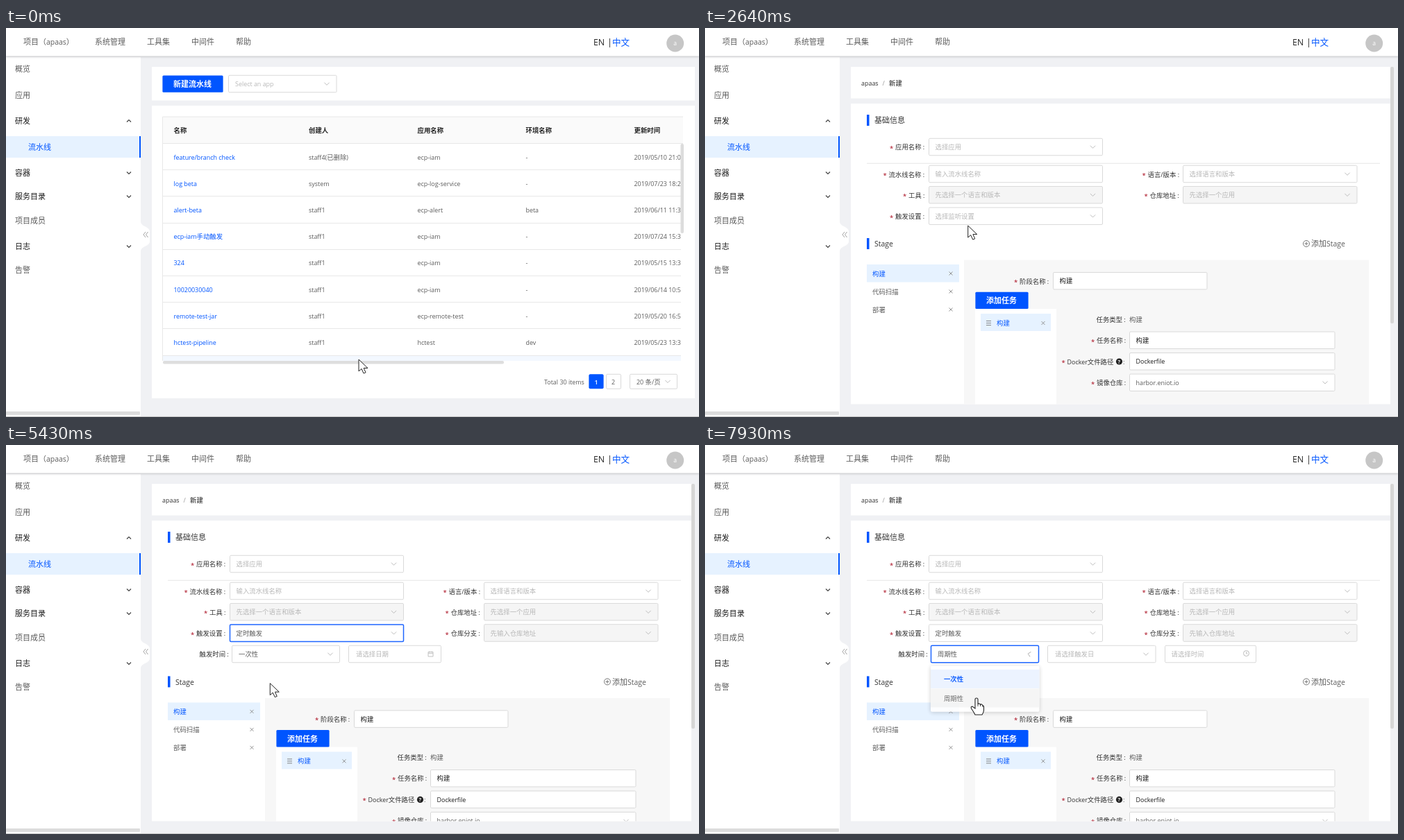
These frames come from a looping animation (998x561 px, 8 s). An HTML page:

```html
<!DOCTYPE html>
<html lang="zh">
<head>
<meta charset="utf-8">
<title>Pipeline</title>
<style>
html, body { margin: 0; width: 100%; height: 100%; overflow: hidden; background: #f0f1f4; }
svg { display: block; width: 100vw; height: 100vh; }
text { font-family: "Open Sans", "Noto Sans CJK SC", "Noto Sans CJK", sans-serif; white-space: pre; }
.float { filter: drop-shadow(0 1px 3px rgba(0,0,0,.2)); }
.bar { filter: drop-shadow(0 1px 1.5px rgba(0,0,0,.2)); }
</style>
</head>
<body>
<svg id="stage" viewBox="0 0 998 561"></svg>
<script>
const BLUE = '#0055ff', PALE = '#e6f2ff', INK = '#1a1a1a', GREY = '#5c5c5c', HINT = '#b8b8b8', LINE = '#d9d9d9';
const LOOP = 8000, SHIFT = 30.4;

// ---- markup helpers ----
// Text is centred vertically on y; Latin runs are set slightly smaller than CJK runs.
function text(x, y, str, { size = 9.4, fill = GREY, weight = 400, id = '' } = {}) {
  const runs = str.split(/([\u2e80-\uffef]+)/).filter(Boolean).map(run =>
    `<tspan font-size="${/[\u2e80-\uffef]/.test(run) ? size : size * .95}">${run}</tspan>`).join('');
  return `<text id="${id}" x="${x}" y="${y + size * .38}" fill="${fill}" font-weight="${weight}">${runs}</text>`;
}
const rect = (x, y, w, h, fill, extra = '') =>
  `<rect x="${x}" y="${y}" width="${w}" height="${h}" fill="${fill}" ${extra}/>`;
const path = (d, stroke, extra = '') => `<path d="${d}" fill="none" stroke="${stroke}" ${extra}/>`;
const at = (x, y, inner, id = '') => `<g id="${id}" transform="translate(${x} ${y})">${inner}</g>`;
const group = (id, inner) => `<g id="${id}">${inner}</g>`;

const chevron = (x, y, id = '') => at(x, y, group(id, path('M-3.6 -1.8L0 1.8L3.6 -1.8', '#bdbdbd')));
const cross = (x, y) => at(x, y, path('M-2.5 -2.5l5 5M2.5 -2.5l-5 5', '#8a8a8a', 'stroke-width=".9"'));
const box = (x, y, w, h = 24.5, { fill = '#fff', id = '' } = {}) =>
  rect(x + .5, y - h / 2, w - 1, h, fill, `id="${id}" stroke="${LINE}" rx="1.5"`);
const button = (x, y, w, label, id = '') =>
  rect(x + .4, y + .4, w - .3, 24.4, BLUE, `rx="1.5" id="${id}"`) +
  text(x + 16, y + 12.7, label, { size: 11, fill: '#fff', weight: 700 });

const label = (x, y, str, { required = true, colon = ' :' } = {}) =>
  (required ? text(x - 8, y + 1.2, '*', { fill: '#a8071a', size: 10 }) : '') + text(x, y, str + colon, { fill: '#333' });
function field(x, y, w, hint, { value, disabled, arrow = true, pad = 9.5 } = {}) {
  return box(x, y, w, 24.5, { fill: disabled ? '#f5f5f5' : '#fff' }) +
    text(x + pad, y, value || hint, { fill: value ? INK : HINT }) + (arrow ? chevron(x + w - 14.5, y) : '');
}
const heading = (y, str) => rect(233, y - 8, 3.5, 16, BLUE) + text(244, y, str, { size: 11, fill: '#333' });

function dropdown(id, x, y, w, options, selected = -1) {
  const rows = options.map((name, i) => {
    const on = i === selected;
    return rect(0, 5.5 + 28 * i, w, 27.5, on ? '#ebf2ff' : '#f5f5f5', on ? '' : `id="${id}Row${i}"`) +
      text(19, 19.5 + 28 * i, name, { fill: on ? BLUE : GREY, weight: on ? 700 : 400 });
  }).join('');
  return at(x, y, group(id, rect(0, 0, w, 11.5 + 28 * options.length, '#fff', 'rx="2" class="float"') + rows));
}

// ---- page frame ----
function frame() {
  const menu = [['概览', 59], ['应用', 97], ['研发', 134, 1], ['容器', 209, -1], ['服务目录', 243, -1],
    ['项目成员', 277.5], ['日志', 315, -1], ['告警', 349]];
  const tabs = [['项目（apaas）', 25], ['系统管理', 128], ['工具集', 203], ['中间件', 267], ['帮助', 331]];
  return rect(0, 0, 998, 561, '#f0f1f4') +
    '<path d="M0 42H194V280Q195 284 200 286Q207 289 207 294V308Q207 312 200 315Q195 317 194 321V561H0Z" fill="#fff"/>' +
    path('M201 294l-3 4l3 4M204.5 294l-3 4l3 4', '#999', 'stroke-width=".9"') +
    rect(0, 0, 998, 40.5, '#fff', 'class="bar"') +
    tabs.map(([name, x]) => text(x, 20, name, { size: 11 })).join('') +
    text(846, 20.5, 'EN', { size: 13, fill: '#222' }) + text(866, 20.5, '|', { size: 13, fill: '#222' }) +
    text(873, 20.5, '中文', { size: 12.6, fill: BLUE }) +
    '<circle cx="963.7" cy="22" r="12.5" fill="#c6c6c6"/>' + text(961.3, 22, 'a', { size: 9, fill: '#fff' }) +
    rect(0, 156, 194, 31, PALE) + rect(192, 156, 2, 31, BLUE) + text(32, 171.5, '流水线', { size: 11, fill: BLUE }) +
    menu.map(([name, y, dir]) => text(13, y, name, { size: 11, fill: dir ? INK : GREY }) +
      (dir ? path(`M174 ${y + dir * 1.5}l3 ${-3 * dir}l3 ${3 * dir}`, '#444', 'stroke-width="1.2"') : '')).join('') +
    rect(0, 553, 193, 5, '#dcdcdc', 'rx="1"');
}

// ---- list page ----
function listPage() {
  const columns = [241.5, 436, 592.5, 748.5, 904.5];
  const rows = `feature/branch check|staff4(已删除)|ecp-iam|-|2019/05/10 21:05
log beta|system|ecp-log-service|-|2019/07/23 18:20
alert-beta|staff1|ecp-alert|beta|2019/06/11 11:32
ecp-iam手动触发|staff1|ecp-iam|-|2019/07/24 15:31
324|staff1|ecp-iam|-|2019/05/15 13:30
10020030040|staff1|ecp-iam|-|2019/06/14 10:52
remote-test-jar|staff1|ecp-remote-test|-|2019/05/20 16:51
hctest-pipeline|staff1|hctest|dev|2019/05/23 13:33`.split('\n').map(r => r.split('|'));
  const heads = ['名称', '创建人', '应用名称', '环境名称', '更新时间'];
  const body = rows.map((row, i) => {
    const y = 186 + i * 38.2;
    return row.map((cell, c) => text(columns[c], y, cell, { fill: c ? GREY : BLUE })).join('') +
      rect(226, Math.floor(y + 18.6), 746, 1, '#e8e8e8');
  }).join('');
  return rect(210, 56, 782, 48.5, '#fff') + rect(210, 112, 782, 422, '#fff') +
    button(225, 68, 87.5, '新建流水线', 'createButton') +
    box(320, 80.5, 156.5) + text(330, 80.5, 'Select an app', { fill: HINT }) + chevron(462, 80.5) +
    rect(226, 128, 749, 38, '#fafafa') + path('M975 128H225.5V480M226 166.5H975', '#e8e8e8') +
    heads.map((h, c) => text(columns[c], 147.5, h, { fill: '#222', weight: 700 })).join('') +
    rect(226, 472, 746, 8, '#f3f8ff', 'id="rowHover"') +
    `<g clip-path="url(#tableClip)">${body}</g>` +
    rect(971.5, 167, 4.5, 129, '#dcdcdc', 'rx="2"') + rect(226, 480, 491, 4.5, '#dedede', 'rx="2"') +
    text(775, 510, 'Total 30 items') +
    rect(839.4, 499.3, 21.2, 21, BLUE, 'rx="2"') + text(847.5, 510, '1', { fill: '#fff', weight: 600 }) +
    box(864, 509.8, 22, 21) + text(872, 510, '2') +
    box(898, 509.8, 69, 21) + text(908, 510.3, '20 条/页') + chevron(953, 509.8);
}

// ---- form page ----
function stageSection() {
  const steps = [['构建', 354], ['代码扫描', 380], ['部署', 406]];
  return heading(311, 'Stage') +
    '<circle cx="866" cy="311" r="4.5" fill="none" stroke="#777"/>' + path('M863.5 311h5M866 308.5v5', '#777') +
    text(873, 311, '添加Stage', { size: 11 }) +
    rect(233, 341, 133, 25.5, PALE) +
    steps.map(([name, y], i) => text(241, y, name, { fill: i ? GREY : BLUE }) + cross(354, y)).join('') +
    rect(373, 334.5, 583, 260, '#f7f7f7') +
    label(453, 365, '阶段名称') + field(501, 364.7, 222.5, '', { value: '构建', arrow: false }) +
    rect(389, 405, 117, 190, '#fff') + button(389, 380.3, 76.5, '添加任务') +
    rect(397, 412, 101, 25, PALE) + path('M405 422.5h7M405 425.5h7M405 428.5h7', '#777', 'stroke-width=".9"') +
    text(420, 425.5, '构建', { fill: BLUE }) + cross(487, 425.5) +
    label(563.5, 420.5, '任务类型', { required: false }) + text(611, 420.5, '构建') +
    label(564, 450.5, '任务名称') + field(611, 450.3, 296.5, '', { value: '构建', arrow: false }) +
    label(521.5, 481, 'Docker文件路径', { colon: '' }) +
    '<circle cx="596.5" cy="481" r="4.6" fill="#222"/>' + text(594.6, 481, '?', { size: 8, fill: '#fff', weight: 700 }) +
    text(602, 481, ':') + field(611, 480.8, 296.5, '', { value: 'Dockerfile', arrow: false }) +
    label(564, 511.5, '镜像仓库') + box(611, 511.3, 296.5) + chevron(893, 511.3) +
    text(620.5, 511.3, '选择镜像仓库', { fill: HINT, id: 'registryHint' }) +
    text(620.5, 511.3, 'harbor.eniot.io', { id: 'registryValue' });
}

function timerRow() {
  const y = 301.5;
  const calendar = at(611.5, y, path('M-3.5 -3h7v6.5h-7zM-3.5 -.8h7M-1.7 -4v2M1.7 -4v2', '#bbb', 'stroke-width=".9"'));
  const clock = at(779.5, y - 1, '<circle r="4" fill="none" stroke="#bbb"/>' + path('M0 -2.5V.5H2', '#bbb', 'stroke-width=".9"'));
  const clear = at(467, y, '<circle r="4.3" fill="#999"/>' + path('M-1.5 -1.5l3 3M1.5 -1.5l-3 3', '#fff'), 'clearIcon');
  return label(640.5, 271.5, '仓库分支') + field(688, 271, 251.5, '先输入仓库地址', { disabled: true }) +
    label(278.5, y, '触发时间', { required: false }) + box(325, y, 156, 24.5, { id: 'modeBox' }) +
    text(335, y, '一次性', { id: 'modeOnce' }) + text(335, y, '周期性', { id: 'modeRepeat' }) +
    clear + group('modeArrowWrap', chevron(467, y, 'modeArrow')) +
    group('onceFields', field(493, y, 134, '请选择日期', { arrow: false, pad: 11 }) + calendar) +
    group('repeatFields', field(493, y, 156.5, '请选择触发日', { pad: 11 }) +
      field(662, y, 132, '请选择时间', { arrow: false }) + clock);
}

function formPage() {
  return rect(210, 56, 777, 45.5, '#fff') + rect(210, 109, 777, 433.5, '#fff') +
    rect(987, 56, 5, 370, '#d6d6d6', 'rx="2" id="pageScroll"') +
    text(225, 79.5, 'apaas', { fill: '#333' }) + text(255.5, 79.5, '/', { fill: '#999' }) + text(265, 79.5, '新建', { fill: INK }) +
    '<g clip-path="url(#formClip)">' + heading(133, '基础信息') +
    label(274, 171.7, '应用名称') + field(322, 171.5, 251, '选择应用') + rect(233, 194.7, 739, 1, '#e6e6e6') +
    label(264.5, 211, '流水线名称') + field(322, 210.5, 251, '输入流水线名称', { arrow: false }) +
    label(637.5, 211, '语言/版本') + field(688, 210.5, 251.5, '选择语言和版本') +
    label(293, 241, '工具') + field(322, 240.7, 251, '先选择一个语言和版本', { disabled: true }) +
    label(640.5, 241, '仓库地址') + field(688, 240.7, 251.5, '先选择一个应用', { disabled: true }) +
    label(274, 271.5, '触发设置') + box(322, 271.2, 251, 24.5, { id: 'triggerBox' }) +
    text(331.5, 271.2, '选择监听设置', { fill: HINT, id: 'triggerHint' }) +
    text(331.5, 271.2, '定时触发', { id: 'triggerValue' }) + chevron(558.5, 271.2, 'triggerArrow') +
    rect(332, 265, 1, 12.5, '#222', 'id="caret"') +
    group('timer', timerRow()) + group('stageSection', stageSection()) + '</g>' +
    dropdown('triggerMenu', 322, 288, 251, ['自动触发', '手动触发', '定时触发']) +
    dropdown('modeMenu', 325, 318.5, 156.5, ['一次性', '周期性'], 0) +
    group('status', rect(-4, 537, 333, 30, '#ebfaf2', 'rx="3" stroke="#bfdccf"') +
      text(-1, 550, '正在等待 beta-portal-cn4.eniot.io 的响应...', { size: 13.6, fill: '#74807b' }));
}

const beamPath = 'M-5 -9H-2L0 -8L2 -9H5M0 -8V9M-5 9.5H-2L0 8.5L2 9.5H5';
const pointer = {
  arrow: '<path d="M0 0V17L4 13.5L7 20L10 18.8L7.2 12.5H13Z" fill="#fff" stroke="#222"/>',
  hand: '<path d="M-2 2Q-2 0 0 0T2 2V9Q2.5 7.5 4 8T5.5 9.5Q6.5 8.5 7.5 9T9 11Q10.5 10.5 10.5 13V18Q10 21 8 24H-2Q-4 20 -7.5 15Q-8.5 12 -6 12L-2 15Z" fill="#fff" stroke="#222" stroke-width="1.1"/>' +
    path('M2 9V12M5.5 9.5V12M9 11V13', '#222', 'stroke-width=".8"'),
  beam: path(beamPath, '#fff', 'stroke-width="3.5"') + path(beamPath, '#111', 'stroke-width="2"')
};

document.getElementById('stage').innerHTML =
  `<clipPath id="tableClip">${rect(226, 128, 746, 352, '#000')}</clipPath>
   <clipPath id="formClip">${rect(210, 109, 777, 433.5, '#000')}</clipPath>` +
  frame() + group('list', listPage()) + group('form', formPage()) + rect(0, 560, 998, 1, '#c6c6c6') +
  group('cursor', '<circle id="click" r="14" fill="#f7e600" opacity=".75"/>' +
    Object.keys(pointer).map(k => group(k, pointer[k])).join(''));

// ---- timeline ----
const moves = [[0, 508, 478], [300, 508, 478], [980, 293, 92], [1140, 291, 87], [1310, 289, 81], [1680, 288, 81],
  [1920, 288, 81], [2700, 380, 288], [2810, 378, 283], [3040, 374.5, 271.5], [3800, 374.5, 271.5], [4500, 364, 367.5],
  [5200, 364, 367.5], [5740, 406, 306], [6080, 410, 299.5], [7100, 410, 299.5], [7400, 391, 365], [LOOP, 391, 365]];
const shapes = [[0, 'arrow'], [940, 'hand'], [1680, 'arrow'], [2900, 'beam'], [3970, 'hand'], [5040, 'arrow'], [5830, 'hand']];
const clicks = [[1450, 1610], [3200, 3340], [4820, 4970], [6620, 6740], [7550, 7700]];

const el = id => document.getElementById(id);
const show = (id, on) => { el(id).style.display = on ? '' : 'none'; };
const attr = (id, name, value) => el(id).setAttribute(name, value);
const clamp = v => Math.min(1, Math.max(0, v));

function cursorAt(t) {
  const i = moves.findIndex(m => m[0] > t);
  const [t0, x0, y0] = moves[i - 1], [t1, x1, y1] = moves[i];
  const k = (1 - Math.cos(Math.PI * (t - t0) / (t1 - t0))) / 2;
  return [x0 + (x1 - x0) * k, y0 + (y1 - y0) * k];
}

function drawMenu(menu, arrow, t, opens, closes) {
  const p = clamp((t - opens) / 160) * clamp(1 - (t - closes) / 160);
  const eased = 1 - (1 - p) ** 3;
  show(menu, p > 0);
  attr(menu, 'transform', `scale(1 ${.8 + .2 * eased})`);
  attr(menu, 'opacity', eased);
  attr(arrow, 'transform', `rotate(${180 * p})`);
}

function outline(id, hovered, focused) {
  attr(id, 'stroke', focused || hovered ? '#1f66ff' : LINE);
  attr(id, 'stroke-width', focused ? 1.5 : 1);
}

function draw(t) {
  const [x, y] = cursorAt(t);
  const shape = shapes.filter(s => s[0] <= t).pop()[1];
  attr('cursor', 'transform', `translate(${x} ${y})`);
  for (const k in pointer) show(k, k === shape);
  show('click', clicks.some(([on, off]) => t >= on && t < off));

  const onForm = t >= 1610, timed = t >= 5040, repeating = t >= 7880;
  show('list', !onForm);
  show('form', onForm);
  show('rowHover', t < 380);
  attr('createButton', 'fill', t >= 1140 ? '#2f77ff' : BLUE);

  show('status', t >= 1680 && t < 2150);
  show('registryHint', t < 1920);
  show('registryValue', t >= 1920);
  outline('triggerBox', t >= 2880 && t < 6680, t >= 3340 && t < 6680);
  show('triggerHint', t < 4970);
  show('triggerValue', t >= 4970);
  show('caret', t >= 3340 && t < 4970 && Math.floor((t - 3340) / 500) % 2 === 0);
  drawMenu('triggerMenu', 'triggerArrow', t, 3340, 4970);
  const active = Math.min(2, Math.max(0, Math.floor((y - 293.5) / 28)));
  for (let i = 0; i < 3; i++) show('triggerMenuRow' + i, i === active);

  show('timer', timed);
  attr('stageSection', 'transform', `translate(0 ${timed ? SHIFT : 0})`);
  attr('pageScroll', 'height', timed ? 353 : 370);
  outline('modeBox', t >= 5830, t >= 6680);
  const clearable = t >= 5830 && t < 7140;
  show('clearIcon', clearable);
  show('modeArrowWrap', !clearable);
  show('modeOnce', !repeating);
  show('modeRepeat', repeating);
  show('onceFields', !repeating);
  show('repeatFields', repeating);
  drawMenu('modeMenu', 'modeArrow', t, 6740, 7860);
  show('modeMenuRow1', y > 351);
}

const start = performance.now();
function tick() {
  draw((performance.now() - start) % LOOP);
  requestAnimationFrame(tick);
}
tick();
</script>
</body>
</html>
```
